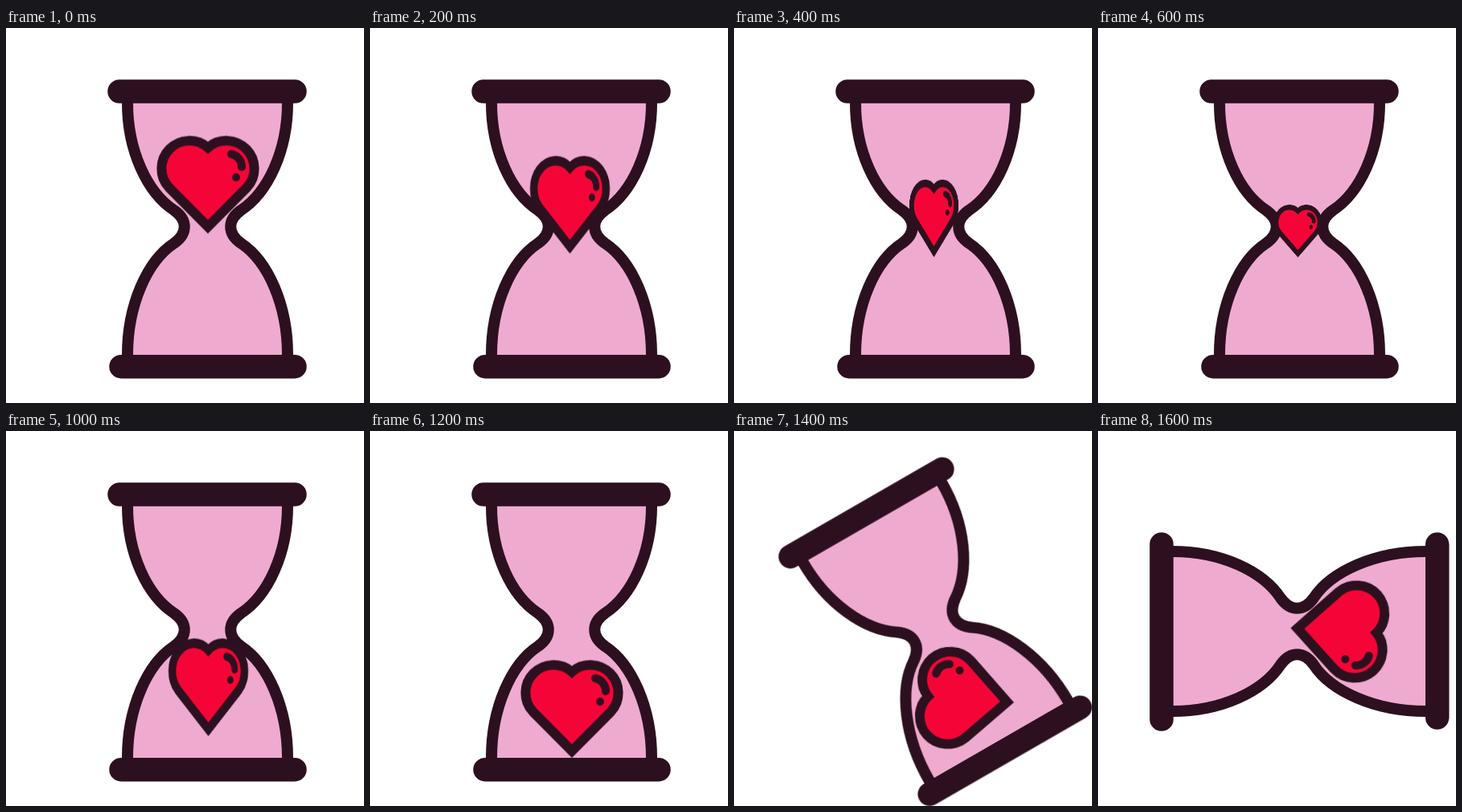
An HTML page without scripts for the animation above (1.8 s loop, 445 by 467 pixels).

```html
<!DOCTYPE html>
<html lang="en">
<head>
<meta charset="utf-8">
<title>Heart hourglass</title>
<style>
  html, body { margin: 0; width: 100%; height: 100%; overflow: hidden; background: #fff; }
  svg { display: block; width: 445px; height: 467px; }

  .ink { fill: none; stroke: #2d101f; }
  .cap { stroke-width: 29.4; stroke-linecap: round; }
  .bulbs { fill: #efaad0; stroke-width: 14; }
  .body { fill: #f50537; stroke-width: 12; stroke-miterlimit: 10; }
  .shine { stroke-width: 10; stroke-linecap: round; }

  .glass, .heart { animation: 1800ms step-end infinite; }
  .glass { transform-origin: 250px 250px; animation-name: turn; }
  .heart { transform-origin: 0 0; animation-name: fall; }

  @keyframes turn {
    0%     { transform: rotate(0deg); }
    77.77% { transform: rotate(-30deg); }
    88.88% { transform: rotate(-90deg); }
  }

  /* squeezed through the neck, then tumbling as the glass turns */
  @keyframes fall {
    0%     { transform: translate(251px, 194.5px); }
    11.11% { transform: translate(248.5px, 219.5px) scale(.78, 1); }
    22.22% { transform: translate(248.5px, 236.5px) scale(.48, .795); }
    33.33% { transform: translate(248.5px, 252.5px) scale(.47, .54); }
    44.44% { transform: translate(248.5px, 281px) scale(.47, .795); }
    55.55% { transform: translate(251.5px, 318.5px) scale(.78, 1); }
    66.66% { transform: translate(251px, 345.5px); }
    77.77% { transform: translate(286.6px, 333.7px) rotate(-86deg); }
    88.88% { transform: translate(300.8px, 248.8px) rotate(93.2deg); }
  }
</style>
</head>
<body>
<svg viewBox="0 0 445 467">
  <g class="glass">
    <path class="ink bulbs" d="M151 85V93C151 153 175.5 205 209 227C226 239 226 256 209 268C175.5 290 151 345 151 407V415H350V407C350 345 325.5 290 292 268C275 256 275 239 292 227C325.5 205 350 153 350 93V85Z"/>
    <path class="ink cap" d="M141 79H359M143 421.7H359"/>
  </g>
  <g class="heart">
    <path class="ink body" d="M0 53L-48.5 4A34.7 34.7 0 0 1 0 -45.5A34.7 34.7 0 0 1 48.5 4Z"/>
    <path class="ink shine" d="M29 -37.5A16 16 0 0 1 42 -21.5M35 -8.5h.01"/>
  </g>
</svg>
</body>
</html>
```
